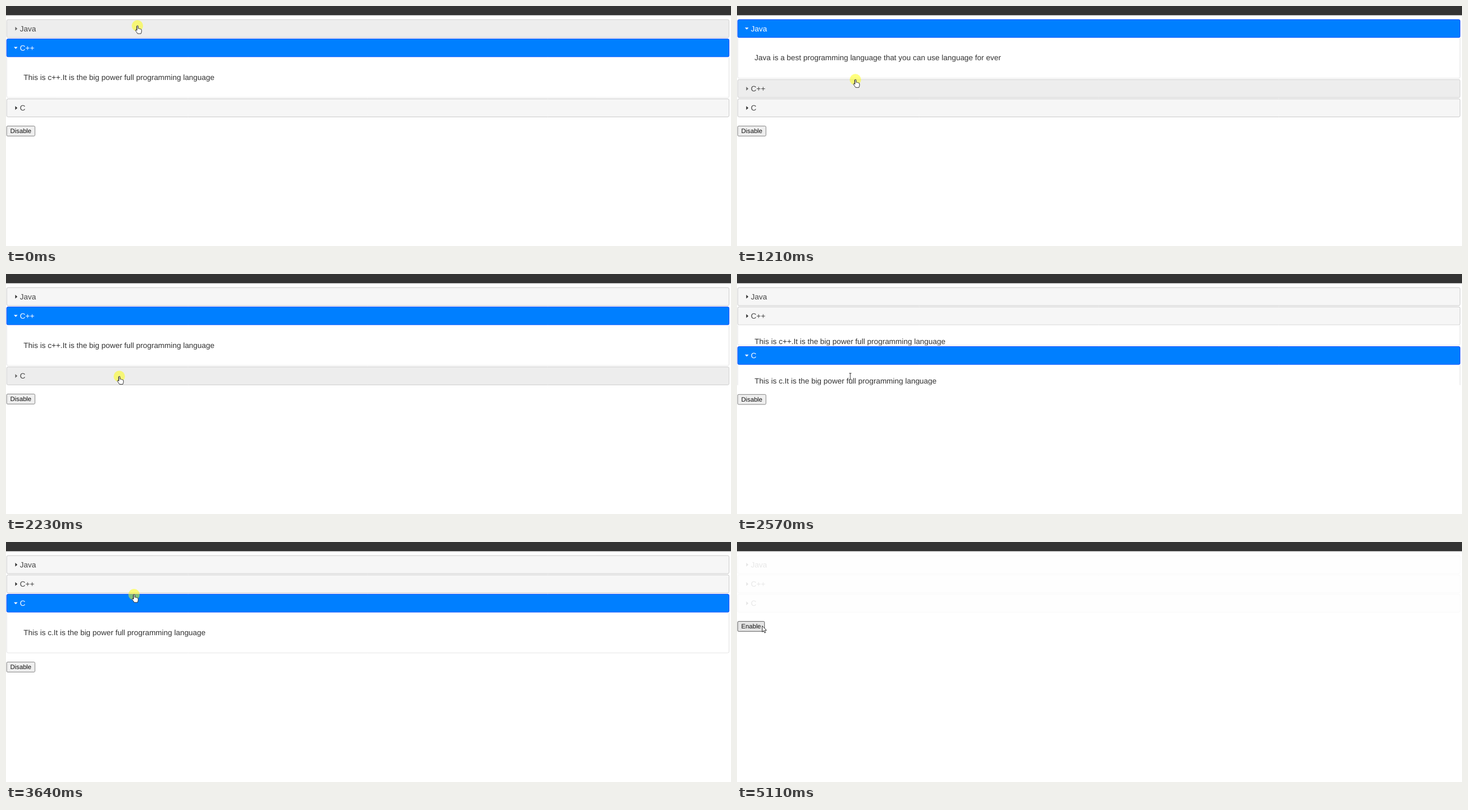
Animation of 1280 by 425 pixels, one loop 5180 ms. Source, as an HTML page with a canvas:

```html
<!DOCTYPE html>
<html lang="en">
<head>
<meta charset="utf-8">
<title>Accordion</title>
<style>
html, body { margin: 0; height: 100%; overflow: hidden; background: #fff; }
canvas { display: block; }
</style>
</head>
<body>
<canvas id="stage" width="1280" height="425"></canvas>
<script>
const c = document.getElementById('stage').getContext('2d');
const LOOP = 5180, HEAD = 32.8, GAP = 1.4, PANEL = 72, PAD = 13.44, LEFT = 0.8, WIDTH = 1276.2;
const FONT = '"Liberation Sans", Arial, sans-serif';

const items = [
  ['Java', 'Java is a best programming language that you can use language for ever'],
  ['C++', 'This is c++.It is the big power full programming language'],
  ['C', 'This is c.It is the big power full programming language']
];

// The screen refreshes in bursts: [first, last, count]
const bursts = [
  [0, 0, 1], [130, 620, 8], [690, 950, 5], [1210, 1210, 1], [1480, 1480, 1], [1680, 1680, 1],
  [1830, 2030, 4], [2230, 2230, 1], [2500, 2710, 4], [3170, 3380, 4], [3640, 3640, 1],
  [3840, 4320, 8], [4390, 4530, 3], [4840, 4840, 1], [5040, 5110, 2]
];
const ticks = bursts.flatMap(([a, b, n]) =>
  Array.from({ length: n }, (_, k) => n > 1 ? a + (b - a) * k / (n - 1) : a));

// Panel switches: [start, duration, closing panel, opening panel]
const switches = [
  [-400, 400, -1, 1], [211, 400, 1, 0], [1280, 400, 0, 1], [2430, 280, 1, 2], [3900, 400, 2, -1]
];
const presses = [[0, 130], [1210, 1480], [2230, 2500], [3640, 3840], [4840, 5040]];
const track = [
  [0, 232, 35], [200, 232, 35], [480, 216, 93], [620, 216, 93], [950, 209, 130.3], [1760, 209, 130.3],
  [2030, 200, 181.3], [3100, 200, 181.3], [3380, 226, 93], [3950, 226, 93], [4320, 62, 183],
  [4530, 44, 148], [LOOP, 44, 148]
];

const hand = new Path2D('M-1 .5Q.2 -.9 1.4 .5V5Q2.6 4.3 3.6 5.4Q4.8 4.9 5.6 6Q7.2 5.8 7.3 7.5V10' +
  'Q7.2 12 6.2 14H.4Q-.8 12 -2.8 9.4Q-4 7.8 -3 7.2Q-2 6.9 -1 8.2ZM-1 8.2V.5');
const arrow = new Path2D('M.5 .5V11.3L3 9L4.8 13L6.6 12.2L4.9 8.3H8.2Z');
const beam = new Path2D('M-2 -5.5H2M0 -5.5V5.5M-2 5.5H2');

const swing = x => 0.5 - Math.cos(Math.PI * Math.min(1, Math.max(0, x))) / 2;

function pointer(t) {
  const k = track.findIndex(p => p[0] > t);
  const [a, x0, y0] = track[k - 1], [b, x1, y1] = track[k];
  const e = swing((t - a) / (b - a));
  return { x: x0 + (x1 - x0) * e, y: y0 + (y1 - y0) * e };
}

function text(s, x, y, size, color) {
  c.font = size + 'px ' + FONT;
  c.fillStyle = color;
  c.fillText(s, x, y);
}

function box(x, y, w, h, r, fill, line) {
  c.beginPath();
  c.roundRect(x + 0.42, y + 0.42, w - 0.84, h - 0.84, r);
  c.fillStyle = fill;
  c.fill();
  c.strokeStyle = line;
  c.lineWidth = 0.9;
  c.stroke();
}

function header(label, y, open, hover) {
  const [fill, line, ink, icon] = open ? ['#007fff', '#003eff', '#fff', '#fff']
    : hover ? ['#ededed', '#ccc', '#444', '#666'] : ['#f6f6f6', '#c5c5c5', '#454545', '#333'];
  box(LEFT, y, WIDTH, HEAD, 2.5, fill, line);
  const m = y + HEAD / 2;
  c.beginPath();
  if (open) { c.moveTo(13.9, m - 1.7); c.lineTo(20.5, m - 1.7); c.lineTo(17.2, m + 1.8); }
  else { c.moveTo(16.3, m - 3.2); c.lineTo(20.1, m + 0.2); c.lineTo(16.3, m + 3.6); }
  c.fillStyle = icon;
  c.fill();
  text(label, 24.6, y + 20.9, 13.44, ink);
}

function panel(body, y, p, closed) {
  const h = PANEL * p;
  c.save();
  c.beginPath();
  c.rect(0, y, 1280, h);
  c.clip();
  box(LEFT, y - 4, WIDTH, h + (closed ? 4 : 9), 2.5, '#fff', '#ddd');
  text(body, 31.1, y + 40 - PAD * (1 - p), 13.44, '#333');
  c.restore();
}

function drawPointer(kind, { x, y }) {
  c.save();
  c.translate(x, y);
  c.strokeStyle = '#222';
  c.lineWidth = 0.9;
  c.lineJoin = 'round';
  if (kind !== beam) {
    c.fillStyle = '#fff';
    c.fill(kind);
  }
  c.stroke(kind);
  c.restore();
}

function draw(t) {
  const at = pointer(t);
  const [start, span, from, to] = switches.filter(s => s[0] <= t).pop();
  const e = swing((t - start) / span), moving = e < 1;
  const disabled = t >= 5110, focused = t >= 3900 && t < 4840 ? 2 : -1;
  let kind = arrow, y = 23.6;

  c.textRendering = 'geometricPrecision';
  c.fillStyle = '#fff';
  c.fillRect(0, 0, 1280, 425);
  c.fillStyle = '#333';
  c.fillRect(0, 0, 1280, 16.4);

  c.globalAlpha = disabled ? 0.1225 : 1;
  items.forEach(([label, body], i) => {
    const over = at.y >= y && at.y < y + HEAD;
    if (over) kind = hand;
    header(label, y, i === to, over || i === focused);
    y += HEAD;
    const p = i === to ? e : i === from ? 1 - e : 0;
    if (p > 0) {
      const lower = moving && i === Math.max(from, to) && from >= 0 && to >= 0;
      panel(body, y, p, !lower);
      const middle = y + 36 - PAD * (1 - p);
      if (Math.abs(at.y - middle) < 9 && at.x > 31 && at.x < 350 && at.y < y + PANEL * p) kind = beam;
      y += PANEL * p + (lower ? 0.7 : 0);
    }
    y += GAP;
  });
  c.globalAlpha = 1;

  y += 14;
  const name = disabled ? 'Enable' : 'Disable';
  c.font = '11.2px ' + FONT;
  const w = c.measureText(name).width + 13.4;
  const over = at.x < w && at.y > y && at.y < y + 18.5;
  box(LEFT, y, w, 18.5, 1.8, over ? '#e5e5e5' : '#efefef', over ? '#4f4f4f' : '#767676');
  text(name, 7.5, y + 13.1, 11.2, '#111');

  if (presses.some(([a, b]) => t >= a && t < b)) {
    c.beginPath();
    c.arc(at.x, at.y, 10, 0, 7);
    c.fillStyle = 'rgba(255,255,0,.5)';
    c.fill();
  }
  drawPointer(kind, at);
}

const begin = performance.now();
function frame() {
  const t = (performance.now() - begin) % LOOP;
  draw(ticks.filter(k => k <= t + 0.5).pop());
  requestAnimationFrame(frame);
}
frame();
</script>
</body>
</html>
```
